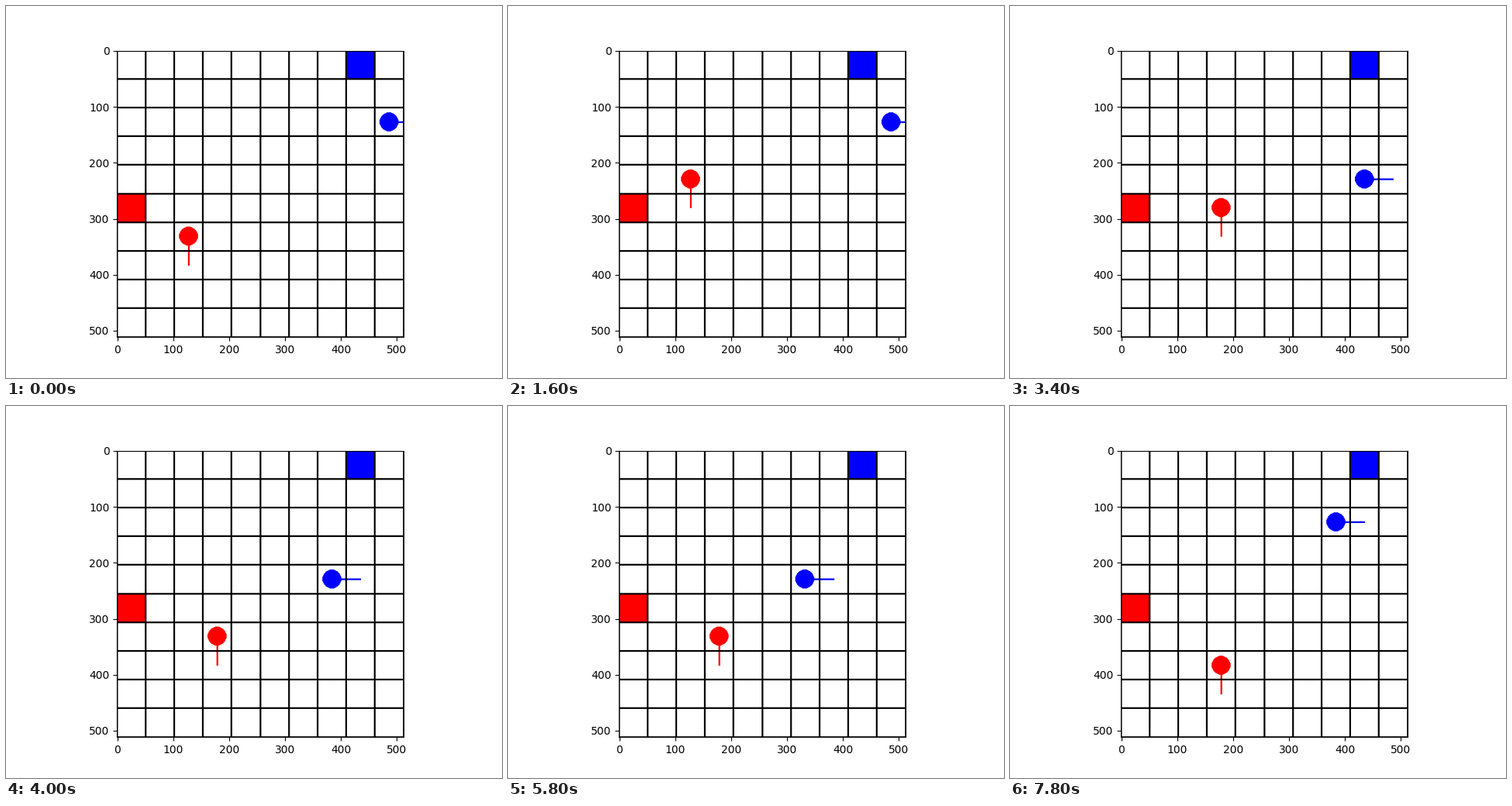
A matplotlib script that plays this animation: 640 by 480 pixels, repeating every 8 s.

```python
import numpy as np
import matplotlib.pyplot as plt
from matplotlib.animation import FuncAnimation

SIZE, CELLS = 512, 10
PIX = SIZE / CELLS
STEP_MS, LOOP_MS = 200, 8000
RED, BLUE, BLACK = (255, 0, 0), (0, 0, 255), (0, 0, 0)
MOVES = {"U": (0, -1), "D": (0, 1), "L": (-1, 0), "R": (1, 0)}

rows, cols = np.mgrid[:SIZE, :SIZE]


class Agent:
    """Disc that jumps one cell at a steady beat, with a fixed heading line."""

    def __init__(self, color, start, heading, first_ms, beat_ms, walk):
        self.color, self.start, self.heading = color, start, MOVES[heading]
        self.first_ms, self.beat_ms, self.walk = first_ms, beat_ms, walk

    def cell(self, t):
        count = max(0, (t - self.first_ms) // self.beat_ms + 1)
        x, y = self.start
        for step in self.walk[:count]:
            dx, dy = MOVES[step]
            x, y = x + dx, y + dy
        return x, y

    def draw(self, img, t):
        center = [(c + 0.5) * PIX for c in self.cell(t)]
        x0, y0 = (int(c) for c in center)
        x1, y1 = (int(c + h * PIX) for c, h in zip(center, self.heading))

        # midpoint-circle rule
        dx, dy = abs(cols - x0 + 0.5), abs(rows - y0 + 0.5)
        near, far = np.minimum(dx, dy), np.maximum(dx, dy)
        img[(near + 0.5) ** 2 + far ** 2 < int(PIX / 3) ** 2] = self.color

        wx, wy = abs(self.heading[1]), abs(self.heading[0])
        img[y0 - wy:y1 + wy + 1, x0 - wx:x1 + wx + 1] = self.color


def fill_cell(img, col, row, color):
    x, y, side = int(col * PIX), int(row * PIX), int(PIX)
    img[y:y + side, x:x + side] = color


def draw_grid(img):
    for i in range(CELLS + 1):
        p = int(i * PIX)
        band = slice(max(p - 1, 0), p + 2)
        img[band, :] = BLACK
        img[:, band] = BLACK


agents = [Agent(RED, (2, 6), "D", 600, 800, "UURDDRLLDR"),
          Agent(BLUE, (9, 2), "R", 1000, 600, "LRDDLLUDLUUR")]


def render(i):
    img = np.full((SIZE, SIZE, 3), 255, np.uint8)
    fill_cell(img, 0, 5, RED)
    fill_cell(img, 8, 0, BLUE)
    for agent in agents:
        agent.draw(img, i * STEP_MS)
    draw_grid(img)
    return img


fig, ax = plt.subplots(figsize=(6.4, 4.8), dpi=100)
view = ax.imshow(render(0))


def update(i):
    view.set_data(render(i))
    return [view]


anim = FuncAnimation(fig, update, frames=LOOP_MS // STEP_MS,
                     interval=STEP_MS, repeat=True, repeat_delay=0)
plt.show()
```
